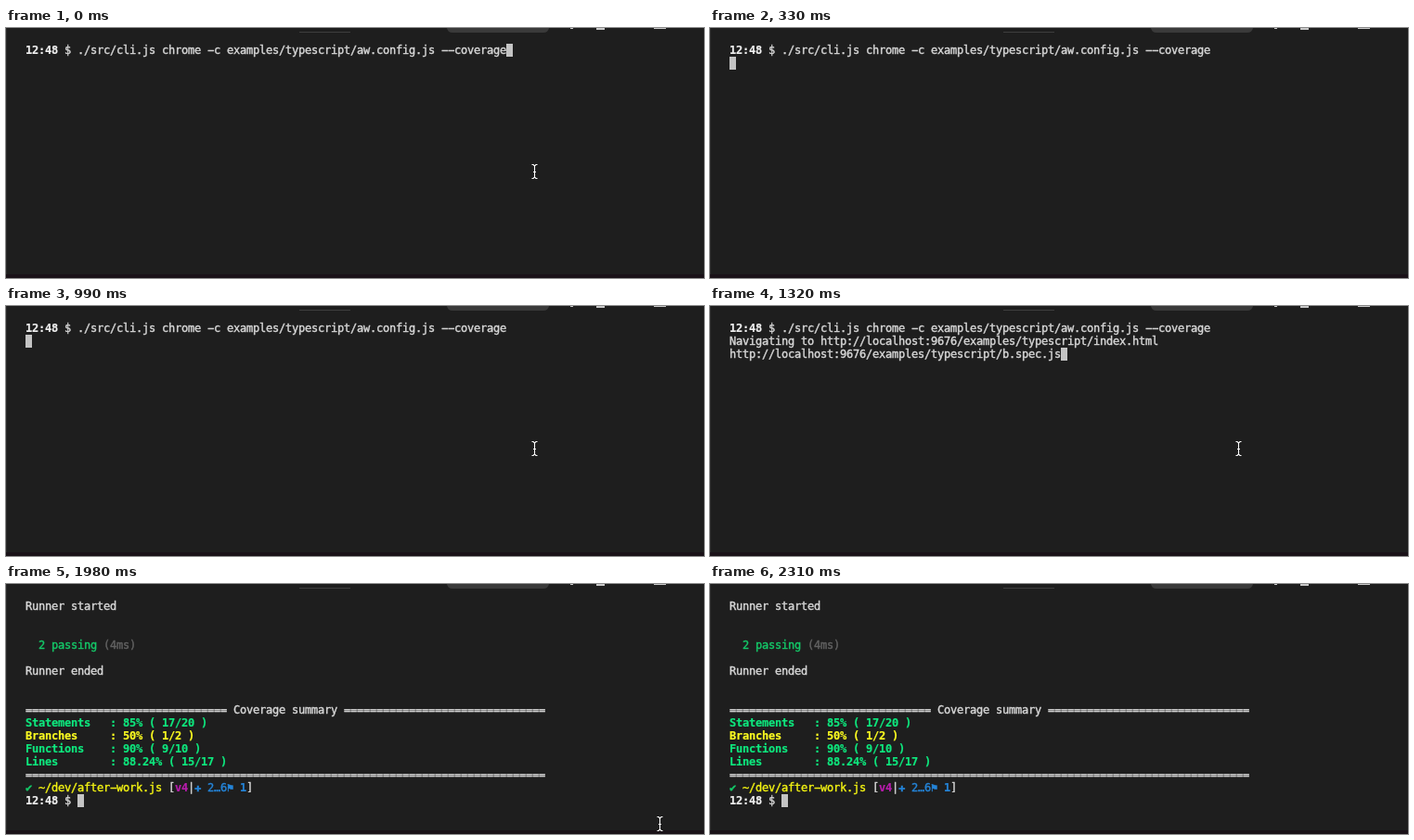
An HTML page for the animation above (2.64 s loop, 752x270 px).

```html
<!DOCTYPE html>
<html lang="en">
<head>
<meta charset="utf-8">
<title>Terminal coverage run</title>
<style>
html, body { margin: 0; width: 100%; height: 100%; overflow: hidden; background: #1e1e1e; }
svg { display: block; }
text {
  font: 12px "DejaVu Sans Mono", "Liberation Mono", monospace;
  white-space: pre;
  stroke: currentColor;
  stroke-width: .4px;
  fill: currentColor;
}
.bold { font-weight: bold; stroke-width: .2px; }
</style>
</head>
<body>
<svg id="stage" width="752" height="270" viewBox="0 0 752 270">
  <rect width="752" height="270" fill="#1e1e1e"/>
  <g id="window">
    <path d="M.5 0V266" stroke="#2b2b2b"/>
    <rect y="266" width="752" height="4" fill="#1a1218"/>
    <path d="M316 4.5H371" stroke="#3e3e3e"/>
    <path d="M475 0H585Q584 5 579 5H481Q476 5 475 0Z" fill="#3a3a3a"/>
    <path d="M608 0h3v1h-3zM636 0h9v2h-9zM698 0h13v1h-13z" fill="#c8c8c8"/>
  </g>
  <g id="screens"></g>
  <rect id="caret" width="7" height="14" fill="#c4c4c4"/>
  <g id="pointer" fill="none">
    <path id="beam" d="M.5 .5H2L3.5 2 5 .5H6.5M3.5 2V14M.5 15.5H2L3.5 14 5 15.5H6.5M2 8.5H5" stroke="#fff" stroke-width="1.1"/>
  </g>
</svg>
<script>
const LOOP = 2640, STEP = 330;
const LEFT = 21, TOP = 17, CELL = 7, LINE = 14, BASELINE = 11;
const WHITE = '#d8d8d8', BRIGHT = '#f0f0f0', GREEN = '#14c868', LIME = '#0ee87e',
      YELLOW = '#f4f412', GOLD = '#fcfc20', BLUE = '#2484d8', MAGENTA = '#b81cac', GRAY = '#626262';
const byId = id => document.getElementById(id);

function make(parent, tag, attrs) {
  const node = document.createElementNS('http://www.w3.org/2000/svg', tag);
  for (const key in attrs) node.setAttribute(key, attrs[key]);
  return parent.appendChild(node);
}

// Each character sits in its own terminal cell.
function write(screen, row, col, text, color = WHITE, bold = false) {
  const x = [...text].map((_, i) => LEFT + (col + i) * CELL).join(' ');
  const node = make(screen, 'text', { x, y: TOP + BASELINE + row * LINE, color });
  if (bold) node.setAttribute('class', 'bold');
  // The terminal font draws hyphens as wide as a minus sign.
  node.textContent = text.replace(/-/g, '\u2212');
}

function prompt(screen, row, command = '') {
  write(screen, row, 0, '12:48', BRIGHT, true);
  write(screen, row, 6, '$ ' + command);
}

const newScreen = () => make(byId('screens'), 'g', {});

const command = newScreen();
prompt(command, 0, './src/cli.js chrome -c examples/typescript/aw.config.js --coverage');

const loading = newScreen();
write(loading, 1, 0, 'Navigating to http://localhost:9676/examples/typescript/index.html');
write(loading, 2, 0, 'http://localhost:9676/examples/typescript/b.spec.js');

const report = newScreen();
const rule = '='.repeat(31);
write(report, 0, 0, 'Runner started');
write(report, 3, 2, '2 passing', GREEN);
write(report, 3, 12, '(4ms)', GRAY);
write(report, 5, 0, 'Runner ended');
write(report, 8, 0, `${rule} Coverage summary ${rule}`);
[
  ['Statements', '85% ( 17/20 )', LIME],
  ['Branches', '50% ( 1/2 )', GOLD],
  ['Functions', '90% ( 9/10 )', LIME],
  ['Lines', '88.24% ( 15/17 )', LIME]
].forEach(([name, value, color], i) =>
  write(report, 9 + i, 0, `${name.padEnd(13)}: ${value}`, color, true));
write(report, 13, 0, '='.repeat(80));
write(report, 14, 0, '✔', GREEN);
write(report, 14, 2, '~/dev/after-work.js', YELLOW);
write(report, 14, 22, '[');
write(report, 14, 23, 'v4', MAGENTA, true);
write(report, 14, 25, '|');
write(report, 14, 26, '✚ 2…6⚑', BLUE);
write(report, 14, 33, '1', BLUE, true);
write(report, 14, 34, ']');
prompt(report, 15);

function show(node, visible) {
  node.setAttribute('visibility', visible ? 'visible' : 'hidden');
}

function caretCell(step) {
  if (step === 0) return [0, 74];
  if (step < 4) return [1, 0];
  return step === 4 ? [2, 51] : [15, 8];
}

function pointerSpot(step) {
  if (step === 0) return [566, 147];
  if (step >= 2 && step <= 4) return [566, 146];
  if (step === 5) return [569, 148];
  return step === 6 ? [701, 251] : null;
}

function render(time) {
  const step = Math.floor((time % LOOP) / STEP);
  show(command, step < 5);
  show(loading, step === 4);
  show(report, step >= 5);

  const [row, col] = caretCell(step);
  byId('caret').setAttribute('x', LEFT + col * CELL);
  byId('caret').setAttribute('y', TOP + row * LINE);

  const spot = pointerSpot(step);
  show(byId('pointer'), spot);
  if (spot) byId('pointer').setAttribute('transform', `translate(${spot})`);
}

const start = performance.now();
function tick() {
  render(performance.now() - start);
  requestAnimationFrame(tick);
}
tick();
</script>
</body>
</html>
```
